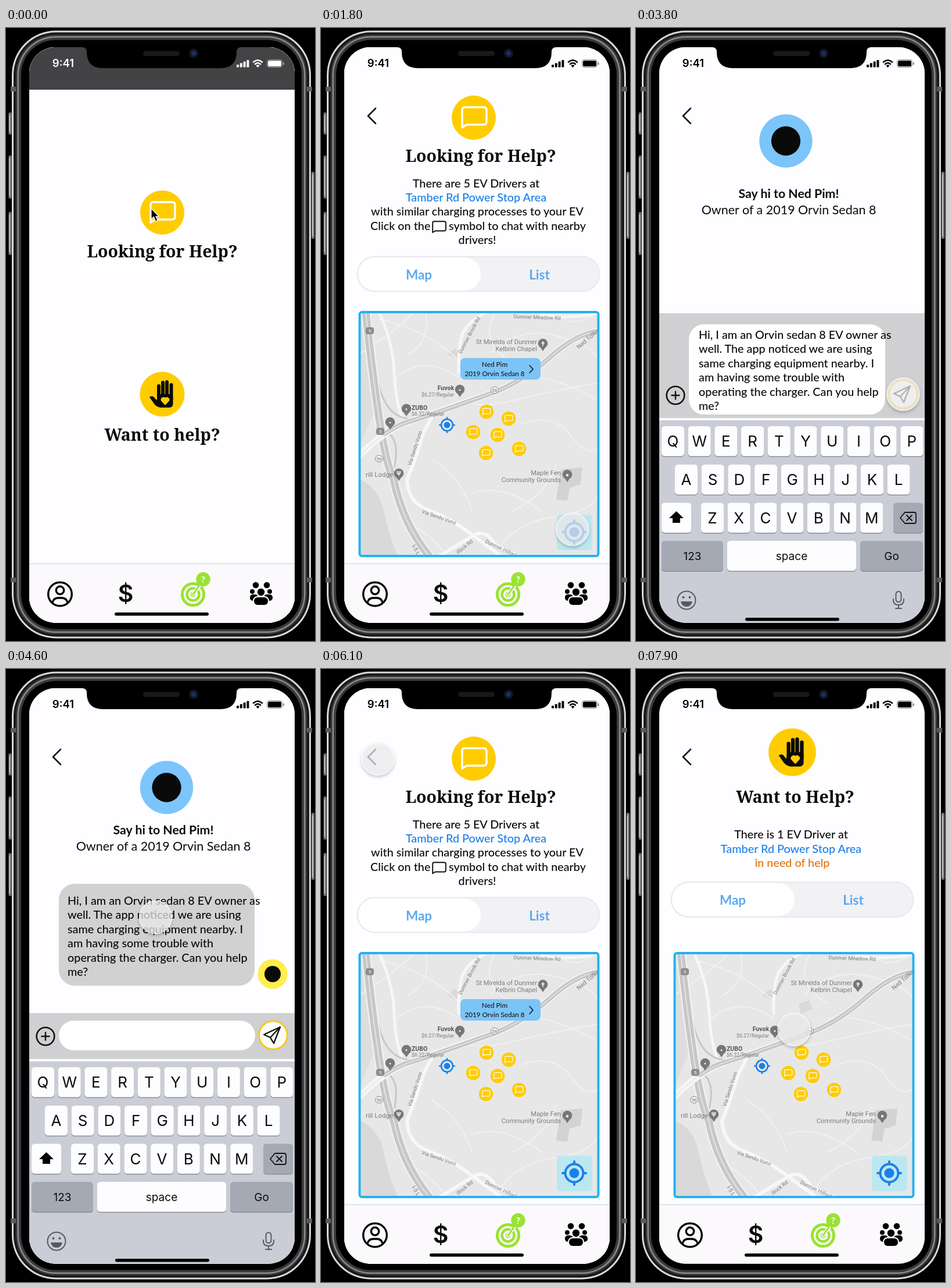
An HTML page for the animation above (8000 ms loop, 532 by 1053 pixels).

```html
<!DOCTYPE html>
<html lang="en">
<head>
<meta charset="utf-8">
<style>
  html, body { margin: 0; width: 100%; height: 100%; overflow: hidden; background: #000; }
  svg { display: block; }
  text { font-family: Lato, sans-serif; }
  .serif { font-family: "Noto Serif", serif; }
  .ui { font-family: Inter, sans-serif; }
  .map { font-family: Roboto, sans-serif; }
</style>
</head>
<body>
<svg id="stage" width="532" height="1053" viewBox="0 0 532 1053"></svg>
<script>
const YELLOW = '#ffcc00', BLUE = '#7cc5fb', LINK = '#1a80ea', LIME = '#9be233';
const CAR = 'Orvin Sedan 8', OWNER = 'Ned Pim';

// Drawing helpers
const rect = (x, y, w, h, r, fill, more = '') =>
  `<rect x="${x}" y="${y}" width="${w}" height="${h}" rx="${r}" fill="${fill}" ${more}/>`;
const circle = (x, y, r, fill, more = '') => `<circle cx="${x}" cy="${y}" r="${r}" fill="${fill}" ${more}/>`;
const line = (d, stroke, w, more = '') =>
  `<path d="${d}" fill="none" stroke="${stroke}" stroke-width="${w}" stroke-linecap="round" stroke-linejoin="round" ${more}/>`;
const shape = (d, fill) => `<path d="${d}" fill="${fill}"/>`;
const at = (x, y, s, body) => `<g transform="translate(${x} ${y}) scale(${s})">${body}</g>`;
const text = (x, y, size, str, { fill = '#0b0b0b', weight = 400, anchor = 'middle', cls = '', turn = 0 } = {}) =>
  `<text x="${x}" y="${y}" font-size="${size}" font-weight="${weight}" fill="${fill}" text-anchor="${anchor}"
    class="${cls}" transform="rotate(${turn} ${x} ${y})">${str}</text>`;
const title = (x, y, str) => text(x, y, 28.5, str, { weight: 700, cls: 'serif' });
const copy = (x, y, str, fill, anchor) => text(x, y, 19.8, str, { weight: 500, fill, anchor });

// Icons, centred on the origin
const bubble = (color, w) => line('M-20 17V-13q0-5 5-5H17q5 0 5 5V7q0 5-5 5H-12Z', color, w);
const hand = line('M-6-14V8M1-20V8M8-21V8M15.5-16V8', '#0a0a0a', 6) + rect(-9, 0, 27.5, 23, 6, '#0a0a0a') +
  shape('M-22 5q6-4 10 3l5 4v10q-5-2-8-7Z', '#0a0a0a') +
  shape('M5 19L-2 11.5a4.6 4.6 0 0 1 7-5.5a4.6 4.6 0 0 1 7 5.5Z', YELLOW);
const locator = circle(0, 0, 15.5, 'none', `stroke="${LINK}" stroke-width="4"`) + circle(0, 0, 8.5, LINK) +
  line('M0-20V-16M0 20V16M-20 0H-16M20 0H16', LINK, 4);
const chatBadge = (x, y) => circle(x, y, 38, YELLOW) + at(x, y, 1, bubble('#fff', 3.4));
const mark = (x, y, r, fill) => circle(x, y, r, fill) + circle(x, y, r * .55, '#0a0a0a');
const chevron = line('M94 138L81 151L94 164', '#0a0a0a', 2.6);

const status = c => text(98.5, 67, 18.5, '9:41', { fill: c, weight: 600, cls: 'ui' }) +
  [0, 1, 2, 3].map(i => rect(397 + i * 5.8, 63 - i * 2.7, 4, 4.5 + i * 2.7, 1, c)).join('') +
  line('M426 58.5q7.5-6.5 15 0M429 62q4.5-4 9 0', c, 2.6) + shape('M430.5 64.5q3-2.5 6 0l-3 3.5Z', c) +
  rect(449.5, 54.5, 26, 13, 4, 'none', `stroke="${c}" stroke-opacity=".5"`) +
  rect(451, 56, 23, 10, 2.5, c) + rect(477, 59, 1.6, 4.5, 1, c, 'opacity=".6"');

const people = circle(430, 957, 5.3, '#000') + circle(449, 957, 5.3, '#000') +
  circle(424, 968, 4, '#000') + circle(454, 968, 4, '#000') +
  rect(420, 973, 14, 11, 5, '#000') + rect(444, 973, 15, 11, 5, '#000') +
  rect(426, 977, 26, 15, 7, '#000', 'stroke="#fbf9fc" stroke-width="2"') +
  circle(439, 969, 7.2, '#000', 'stroke="#fbf9fc" stroke-width="2"');

const nav = rect(40, 920, 457, 102, 0, '#fbf9fc') + rect(40, 919.5, 457, 1.2, 0, '#c5dada') +
  circle(93, 972.5, 20.3, 'none', 'stroke="#000" stroke-width="3.4"') +
  circle(93, 966, 6.7, 'none', 'stroke="#000" stroke-width="3.4"') +
  line('M80 987q2-8 10-8h6q8 0 10 8', '#000', 3.4) +
  text(206, 986, 41, '$', { weight: 600, cls: 'ui' }) +
  circle(322, 973, 18.6, 'none', `stroke="${LIME}" stroke-width="5"`) +
  circle(322, 973, 10.5, 'none', `stroke="${LIME}" stroke-width="4.5"`) + circle(322, 973, 4.5, LIME) +
  line('M322 973L334 957', '#fbf9fc', 6) + line('M322 973L332 959', LIME, 3) +
  circle(339.5, 947, 12.2, LIME) + shape('M328 948l1 11 9-2Z', LIME) +
  text(339.5, 953, 16, '?', { fill: '#fff', weight: 700 }) + people +
  rect(187, 1004, 162, 5.5, 3, '#000');

// Street map
const label = (x, y, size, str, anchor = 'end', turn = 0, weight = 400) =>
  text(x, y, size, str, { fill: weight > 400 ? '#555' : '#7c7c7c', weight, anchor, cls: 'map', turn });
const pin = (x, y, glyph) => shape(`M${x - 6} ${y + 4}L${x} ${y + 13}L${x + 6} ${y + 4}Z`, '#777') +
  circle(x, y, 8.3, '#777') + text(x, y + 4, 10, glyph, { fill: '#fff', weight: 700, cls: 'map' });
const shield = (x, y, n) => rect(x - 6.5, y - 5.5, 13, 11, n > 9 ? 5.5 : 3, n > 9 ? '#f5f5f5' : '#8d8d8d', 'stroke="#888"') +
  text(x, y + 3, 8, n, { fill: n > 9 ? '#666' : '#fff', cls: 'map' });

const minor = `M66 560Q130 520 160 488M100 500Q190 520 240 575M130 600Q180 560 236 600M300 488Q270 540 330 575
  M330 600Q390 590 477 640M290 560Q340 510 410 530T477 575M180 488Q190 540 150 560M410 490Q430 520 477 488
  M240 640Q270 655 330 640T477 610M345 680Q400 660 430 700T477 720M300 905Q330 850 400 840T477 800
  M330 830Q390 800 405 750M190 740Q240 770 260 830M260 800Q310 780 380 830M150 850Q190 870 215 905`;
const highway = 'M77 488Q88 590 100 670T125 775Q140 850 186 907';
const parkway = 'M66 735Q110 690 155 675T300 625Q350 605 395 565T477 521';
const creek = 'M237 592Q236 545 244 525T285 488';
const valley = 'M196 660Q177 690 170 715T148 776Q150 815 185 828T250 863T310 907';

const map = `<g clip-path="url(#mapClip)">` + rect(66, 488, 412, 420, 4, '#e7e7e8') +
  shape('M66 775Q100 790 108 830T132 907H66Z', '#d9d9da') + shape('M66 488H78L98 640L66 720Z', '#dededf') +
  shape('M407 797L413 758L450 755L447 784L428 790L424 812L405 810Z', '#d3d3d4') +
  shape('M280 575l18-6 6 14-20 10ZM217 560l14-10 8 8-6 12Z', '#d9d9da') +
  line(minor, '#f1f1f1', 2) + line(creek + 'M100 488Q124 540 126 590T140 670M380 493Q430 500 477 490', '#f6f6f6', 5) +
  line(valley + 'M205 907Q240 885 262 872T300 888L340 907', '#f7f7f7', 6) +
  line('M97 600Q110 680 170 671M104 690Q140 700 125 760', '#c8c8c8', 3) +
  line(highway, '#f4f4f4', 17) + line(highway, '#c7c7c8', 13) + line(highway, '#e4e4e4', 2) +
  line(parkway, '#f6f6f6', 11) + line('M110 697Q135 680 155 675T300 625Q350 605 395 565T477 521', '#c6c6c7', 8) +
  line(parkway, '#e7e7e7', 1.5) +
  label(372, 543, 11.2, 'St Mirelda of Dunmer') + label(372, 555, 11.2, 'Kelbrin Chapel') +
  label(372, 500, 9, 'Dunmer Meadow Rd', 'middle', 2) + label(258, 529, 9, 'Dunmer Brook Rd', 'middle', -62) +
  label(444, 552, 10.5, 'Ned Tolliver', 'start', -41) +
  label(229, 622, 10.5, 'Fuvok', 'end', 0, 700) + label(229, 633, 8.9, '$6.27/Regular') +
  label(156, 656, 10.5, 'ZUBO', 'start', 0, 700) + label(156, 666, 8.9, '$6.32/Regular', 'start') +
  label(155, 752, 8.8, 'Via Sendo Vuno', 'start', -72) + label(173, 833, 8.8, 'Via Sendo Vuno', 'start', 19) +
  label(124, 771, 11.5, 'rill Lodge') + label(413, 768, 11.2, 'Maple Fen') + label(413, 780, 11.2, 'Community Grounds') +
  label(236, 904, 9, 'illock Rd', 'start', -39) + label(282, 884, 9, 'Dunmer Hillock Rd', 'start', 25) +
  label(156, 890, 10, 'I-5 Lo', 'start', 60) +
  shield(84, 520, 5) + shield(102, 693, 5) + shield(299, 622, 56) + shield(100, 740, 56) +
  pin(239, 621, '▪') + pin(147, 654, '▪') + pin(119, 677, '▪') + pin(382, 542, '✝') + pin(424, 767, '●') + pin(134, 765, 'Ψ') +
  '</g>' + rect(66.5, 488, 411, 419, 4, 'none', 'stroke="#23b2f2" stroke-width="4"') +
  at(217, 682, .64, locator) +
  [[285, 659], [323, 671], [262, 694], [304, 699], [284, 730], [341, 723]]
    .map(([x, y]) => circle(x, y, 12.2, YELLOW) + at(x, y, .31, bubble('#fff', 4))).join('') +
  rect(406, 836, 61, 61, 6, '#bce7f1') + at(436, 866, 1, locator);

const toggle = (x, y) => rect(x + .5, y, 417, 60, 30, '#f2f1f4', 'stroke="#e5e4e8" stroke-width="1.5"') +
  rect(x + 2, y + 1.5, 211, 57, 28.5, '#fff') +
  text(x + 106.5, y + 39, 22.5, 'Map', { weight: 700, fill: '#5aa9ef' }) +
  text(x + 314, y + 39, 22.5, 'List', { weight: 700, fill: '#5aa9ef' });

// Screens
const page = rect(40, 33, 457, 989, 0, '#fefdff');
const station = y => copy(267, y, 'Tamber Rd Power Stop Area', LINK);

const home = page + rect(40, 33, 457, 73, 0, '#434244') + status('#fff') +
  chatBadge(269, 317) + title(269, 394, 'Looking for Help?') +
  circle(269, 629, 38.5, YELLOW) + at(269, 629, 1, hand) + title(269, 709, 'Want to help?') + nav;

const popup = rect(240, 567, 138, 37, 8, '#7bc4f7') + text(299, 582, 11.8, OWNER) +
  text(299, 598, 11.7, '2019 ' + CAR) + line('M359 579.5L365 586L359 592.5', '#111', 1.5);

const help = page + status('#000') + chevron + chatBadge(263, 154) + title(275, 230, 'Looking for Help?') +
  copy(267, 274, 'There are 5 EV Drivers at') + station(298) +
  copy(269, 322, 'with similar charging processes to your EV') +
  copy(85, 347, 'Click on the', undefined, 'start') + at(203, 342, .54, bubble('#111', 3.6)) +
  copy(220, 347, 'symbol to chat with nearby', undefined, 'start') + copy(269, 371, 'drivers!') +
  toggle(62, 392.5) + map + popup + nav;

const want = page + status('#000') + chevron + circle(269, 143, 41, YELLOW) + at(269, 143, 1.06, hand) +
  title(274, 230, 'Want to Help?') + copy(267, 291, 'There is 1 EV Driver at') + station(316) +
  copy(269, 340, 'in need of help', '#e2730f') + toggle(60, 366) + map + nav;

const GREY = '#a5a9b4';
const key = (x, y, w, str, fill = '#fdfcff', size = 26) =>
  rect(x, y + 1.5, w, 51.5, 5.5, '#8b8e96') + rect(x, y, w, 51.5, 5.5, fill) +
  text(x + w / 2, y + (size > 22 ? 35 : 33), size, str, { cls: 'ui' });
const row = (str, x, y) => [...str].map((c, i) => key(x + i * 45.7, y, 39, c)).join('');
const keyboard = rect(40, 674, 457, 348, 0, '#cacdd5') +
  row('QWERTYUIOP', 44, 684) + row('ASDFGHJKL', 67, 750) + row('ZXCVBNM', 112, 815.5) +
  key(44, 815.5, 51, '') + shape('M69.5 830L82 842H76V850H63V842H57Z', '#000') +
  key(443, 815.5, 51, '', GREY) + line('M455 841.5L463 832H479q3 0 3 3V848q0 3-3 3H463ZM466 837L475 846M475 837L466 846', '#111', 1.8) +
  key(44, 881, 106, '123', GREY, 19) + key(157, 881, 222, 'space', undefined, 19) + key(386, 881, 108, 'Go', GREY, 19) +
  circle(87, 983, 15.5, 'none', 'stroke="#555a62" stroke-width="2"') +
  circle(81.5, 978, 2, '#555a62') + circle(92.5, 978, 2, '#555a62') +
  shape('M77 985H97Q95 994 87 994T77 985Z', '#555a62') +
  rect(447.5, 968, 9, 18, 4.5, 'none', 'stroke="#555a62" stroke-width="2"') +
  line('M443 981v2q0 8 9 8t9-8v-2M452 991v6M447 997h10', '#555a62', 2) + rect(188, 1013, 162, 5.5, 3, '#000');

const MESSAGE = ['Hi, I am an Orvin sedan 8 EV owner as', 'well. The app noticed we are using',
  'same charging equipment nearby. I', 'am having some trouble with', 'operating the charger. Can you help', 'me?'];
const message = (x, y) => MESSAGE.map((s, i) => copy(x, y + i * 24.4, s, undefined, 'start')).join('');
const heading = (ax, ay, x, y) => mark(ax, ay, 45.7, BLUE) +
  text(x, y, 21.3, `Say hi to ${OWNER}!`, { weight: 700 }) + text(x, y + 28, 21.5, 'Owner of a 2019 ' + CAR);
const composer = (top, inputTop, bottom, r) => rect(40, top, 457, 670 - top, 0, '#d0cfd1') +
  rect(91, inputTop, 338, bottom - inputTop, r, '#fff') +
  circle(68, 631, 15.3, 'none', 'stroke="#111" stroke-width="2.6"') + line('M61.5 631H74.5M68 624.5V637.5', '#111', 2.4) +
  circle(460, 629, 24.3, '#fff', 'stroke="#f5cc1c" stroke-width="3"') +
  line('M472 615L444 628L455 633L461 643ZM472 615L455 633', '#111', 2.4);

const chat = page + status('#000') + chevron + keyboard +
  heading(258, 194, 263, 292) + composer(490, 509, 664, 26) + message(108, 534) +
  `<g id="sent">` + rect(40, 166, 457, 504, 0, '#fefdff') + rect(200, 110, 120, 60, 0, '#fefdff') +
  heading(276.5, 203.5, 271, 284) + rect(91, 369, 337, 175, 27, '#d2d1d2') + message(106, 405) +
  mark(459, 524, 25.5, '#ffee4c') + composer(591, 604, 655, 25.5) + '</g>';

// Phone body
const casing = [[10, '#d9d9db'], [13, '#19191a'], [17, '#3a3a3c'], [19.5, '#8b8b8e'], [22, '#3b3b3d'], [26, '#000']]
  .map(([x, fill]) => rect(x, x - 5.5, 535 - 2 * x, 1056 - 2 * (x - 4), 86 - x, fill)).join('');
const buttons = [[4.5, 145, 38], [4.5, 219, 74], [4.5, 316, 74], [526, 247, 115]]
  .map(([x, y, h]) => rect(x, y, 5, h, 2, '#77777a') + rect(x + 1, y + 4, 1.5, h - 8, 1, '#c9c9cc')).join('');
const antennas = [101, 944].map(y => rect(8, y, 9, 8, 0, '#5d5d60') + rect(518, y, 9, 8, 0, '#5d5d60')).join('');
const notch = shape('M131 30V33Q139 33 139 41Q139 69 167 69H369Q397 69 397 41Q397 33 405 33V30Z', '#000') +
  rect(236, 39.5, 63, 8.5, 4.2, '#19191b') + circle(323, 43.5, 8, '#15161b') + circle(323, 43.5, 4, '#17306b');

document.getElementById('stage').innerHTML = `<defs>
  <clipPath id="screenClip">${rect(40, 33, 457, 988.5, 45, '#000')}</clipPath>
  <clipPath id="mapClip">${rect(66, 488, 412, 420, 4, '#000')}</clipPath>
  <filter id="soft" x="-50%" y="-50%" width="200%" height="200%"><feDropShadow dx="0" dy="3" stdDeviation="2.5" flood-opacity=".3"/></filter>
  </defs>` + rect(0, 0, 532, 1053, 0, '#000') + buttons + casing + antennas +
  `<g clip-path="url(#screenClip)"><g id="want">${want}</g><g id="chat">${chat}</g><g id="help">${help}</g><g id="home">${home}</g></g>` +
  notch + `<g id="touch">${circle(0, 0, 28, '#f3f2f3', 'fill-opacity=".68" stroke="#fff" stroke-opacity=".7" stroke-width="1.5" filter="url(#soft)"')}</g>` +
  `<g id="arrow"><path d="M250 310V328L254.5 324.5L257.5 332L261 330.5L258 323.5H263Z" stroke="#fff" stroke-width="1.2"/></g>`;

const el = Object.fromEntries(['chat', 'help', 'home', 'sent', 'touch', 'arrow'].map(id => [id, document.getElementById(id)]));
const show = (node, on) => node.setAttribute('display', on ? 'inline' : 'none');
const move = (node, x, y = 0) => node.setAttribute('transform', `translate(${x} ${y})`);

// Finger path: time, x, y
const PATH = [[0, 262, 322], [700, 270, 317], [1600, 433, 861], [1900, 433, 861], [2450, 310, 586], [2750, 310, 586],
  [2900, 321, 597], [3500, 460, 629], [4000, 460, 629], [4600, 258, 427], [5050, 98, 154], [6450, 98, 154], [7150, 272, 619], [8000, 272, 619]];

function finger(t) {
  const i = PATH.findIndex(p => p[0] > t), [t0, x0, y0] = PATH[i - 1], [t1, x1, y1] = PATH[i];
  const u = (t - t0) / (t1 - t0);
  return [x0 + (x1 - x0) * u, y0 + (y1 - y0) * u];
}

function draw(t) {
  const ease = start => 1 - (1 - Math.min(1, Math.max(0, (t - start) / 360))) ** 3;
  move(el.home, -457 * (ease(400) - ease(6350) + ease(7400)));
  move(el.help, -457 * (ease(2700) - ease(5300)));
  show(el.help, t < 7400);
  show(el.chat, t < 7400);
  el.sent.setAttribute('opacity', ease(3850));
  move(el.touch, ...finger(t));
  show(el.touch, t >= 200);
  show(el.arrow, t < 200);
}

function tick() {
  draw(performance.now() % 8000);
  requestAnimationFrame(tick);
}
tick();
</script>
</body>
</html>
```
